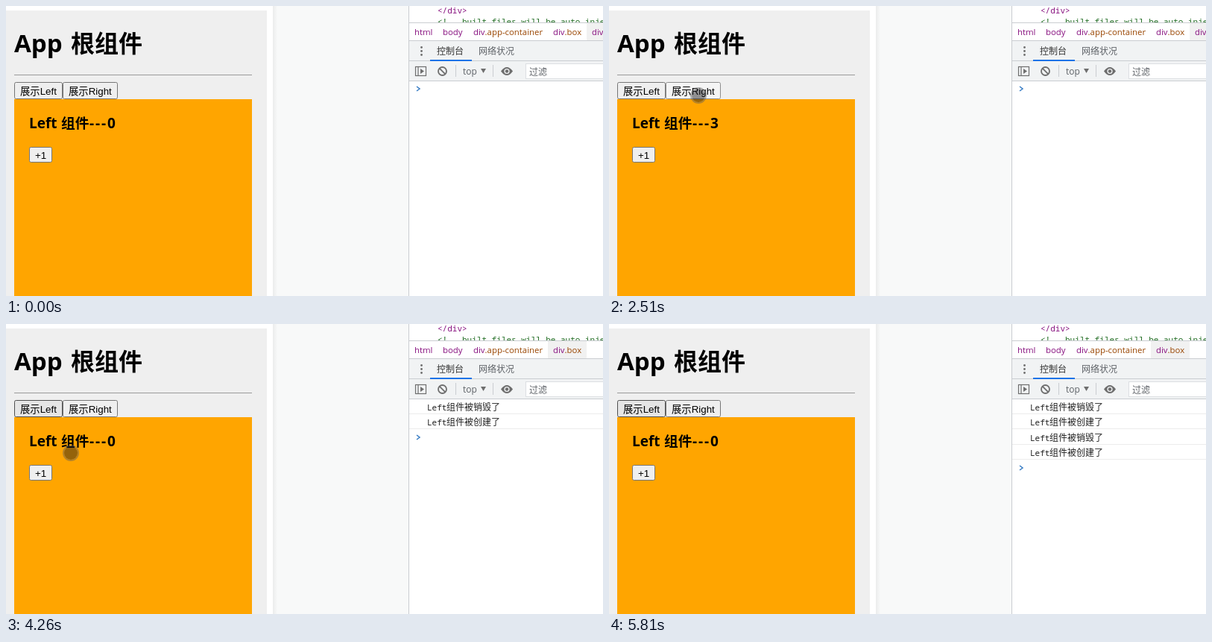
An HTML page with a canvas for the animation above (6340 ms loop, 801 by 389 pixels).

```html
<!DOCTYPE html>
<html lang="zh-CN">
<head>
<meta charset="utf-8">
<title>组件生命周期</title>
<style>
html, body { margin: 0; width: 100%; height: 100%; overflow: hidden; background: #fff; }
canvas { display: block; }
</style>
</head>
<body>
<canvas id="stage" width="801" height="389"></canvas>
<script>
const ctx = document.getElementById('stage').getContext('2d');
const LOOP = 6340;
const CJK = '"Noto Sans CJK SC", "Noto Sans CJK", sans-serif';
const HEAD = `"Noto Sans", ${CJK}`;
const BUTTON = `"Liberation Sans", ${CJK}`;
const MONO = '"Noto Sans Mono", monospace';
const CRUMB = '"Open Sans", sans-serif';
const PURPLE = '#881280', BROWN = '#994500', LINE = '#cacdd1', ICON = '#6e6e6e';

// Pointer moves: start, end, number of steps, evenly timed points
const moves = [
  [130, 740, 9, [[567, 358], [430, 280], [290, 203], [222, 180], [134, 133]]],
  [810, 1430, 10, [[135, 132], [120, 126], [78, 160], [38, 195]]],
  [1490, 1690, 4, [[38, 195], [40, 195]]],
  [1830, 2380, 9, [[50, 190], [76, 180], [97, 158], [113, 135], [120, 120]]],
  [2720, 3130, 7, [[120, 122], [105, 132], [82, 130], [64, 124]]],
  [3270, 3340, 2, [[62, 123], [61, 122]]],
  [4000, 4600, 10, [[61, 122], [66, 140], [75, 160], [93, 179.5], [130, 180], [146, 150], [122, 118]]],
  [4730, 5340, 10, [[122, 118], [122, 118], [90, 112], [61, 114]]],
];
const POINTER_HIDES = 5810;

// Values that hold from a given time on
const counts = [[0, 0], [1560, 1], [1690, 2], [1830, 3], [3610, 0]];
const views = [[0, 'Left'], [2580, 'Right'], [3610, 'Left'], [4800, 'Right'], [5540, 'Left']];
const plusStates = [[0, ''], [1360, 'hover'], [1490, 'active'], [1960, '']];
const leftStates = [[0, ''], [3270, 'hover'], [3540, 'active'], [3610, 'hover'], [4530, ''],
  [5270, 'hover'], [5470, 'active'], [5540, 'hover']];
const rightStates = [[0, ''], [2310, 'hover'], [2510, 'active'], [2580, 'hover'], [3270, ''],
  [4530, 'hover'], [4730, 'active'], [4930, 'hover'], [5270, '']];
const logs = views.slice(1).map(([time, view]) =>
  [time, view === 'Right' ? '组件被销毁了' : '组件被创建了']);

const at = (track, t) => track.filter(([time]) => time <= t).pop()[1];

function rect(x, y, w, h, color) {
  ctx.fillStyle = color;
  ctx.fillRect(x, y, w, h);
}

function text(str, x, y, font, color) {
  ctx.font = font;
  ctx.fillStyle = color;
  ctx.fillText(str, x, y);
}

function disc(x, y, r, color) {
  ctx.fillStyle = color;
  ctx.beginPath();
  ctx.arc(x, y, r, 0, Math.PI * 2);
  ctx.fill();
}

function polyline(points, color, width) {
  ctx.strokeStyle = color;
  ctx.lineWidth = width;
  ctx.beginPath();
  points.forEach(([x, y]) => ctx.lineTo(x, y));
  ctx.stroke();
}

function polygon(points, color) {
  ctx.fillStyle = color;
  ctx.beginPath();
  points.forEach(([x, y]) => ctx.lineTo(x, y));
  ctx.fill();
}

function button(label, x, y, w, h, state) {
  const [fill, border] = {
    '': ['#efefef', '#767676'],
    hover: ['#e5e5e5', '#4f4f4f'],
    active: ['#f5f5f5', '#8d8d8d'],
  }[state];
  ctx.beginPath();
  ctx.roundRect(x + .5, y + .5, w - 1, h - 1, 2);
  ctx.fillStyle = fill;
  ctx.fill();
  ctx.strokeStyle = border;
  ctx.lineWidth = 1;
  ctx.stroke();
  text(label, x + 8, y + h / 2 + 5, `13.333px ${BUTTON}`, '#000');
}

function drawPage(t) {
  rect(0, 0, 358, 389, '#fff');
  rect(0, 6, 350, 383, '#efefef');
  rect(358, 0, 183, 389, '#f8f9f9');
  const shade = ctx.createLinearGradient(358, 0, 364, 0);
  shade.addColorStop(0, '#ebecec');
  shade.addColorStop(1, '#f8f9f9');
  rect(358, 0, 6, 389, shade);

  text('App', 11, 62, `bold 33px ${HEAD}`, '#000');
  text('根组件', 87, 62, `bold 32px ${CJK}`, '#000');
  rect(11, 92, 319, 1, '#9a9a9a');
  button('展示Left', 11, 102, 65, 23, at(leftStates, t));
  button('展示Right', 76, 102, 74, 23, at(rightStates, t));

  const view = at(views, t), isLeft = view === 'Left';
  const bold = `bold 19px ${HEAD}`;
  rect(11, 125, 319, 264, isLeft ? '#ffa500' : '#87cefa');
  text(view, 31, 164, bold, '#000');
  text('组件', isLeft ? 74 : 87.5, 164, `bold 18.72px ${CJK}`, '#000');
  if (isLeft) {
    for (let i = 0; i < 3; i++) text('-', 112 + i * 8, 164, bold, '#000');
    text(at(counts, t), 136, 164, bold, '#000');
    button('+1', 31, 189, 31, 21, at(plusStates, t));
  }
}

function drawCrumbs(replaced) {
  const font = `11.4px ${CRUMB}`;
  rect(541, 22, 260, 1, LINE);
  rect(541, 23, 260, 23, '#fff');
  if (replaced) rect(727, 23, 52, 23, '#f1f1f1');
  else rect(779, 23, 22, 23, '#f1f1f1');
  text('html', 548, 39, font, PURPLE);
  text('body', 586, 39, font, PURPLE);
  for (const [x, name] of [[627, '.app-container'], [734, '.box']]) {
    text('div', x, 39, font, PURPLE);
    text(name, x + ctx.measureText('div').width, 39, font, BROWN);
  }
  if (!replaced) text('div', 786, 39, font, PURPLE);
}

function drawToolbar() {
  rect(541, 46, 260, 55, '#f1f3f4');
  for (const y of [46, 73, 100]) rect(541, y, 260, 1, LINE);
  for (const y of [55.5, 60.5, 65.5]) disc(557.5, y, 1.4, ICON);
  text('控制台', 578, 65, `12px ${CJK}`, '#333');
  text('网络状况', 634, 65, `12px ${CJK}`, '#5f6368');
  rect(569, 72, 56, 2, '#1a73e8');

  ctx.strokeStyle = ICON;
  ctx.lineWidth = 1.2;
  ctx.strokeRect(549.5, 81.5, 14, 12);
  polyline([[553, 81], [553, 94]], ICON, 1.2);
  polygon([[556, 84], [561, 87.5], [556, 91]], ICON);

  ctx.lineWidth = 1.8;
  ctx.beginPath();
  ctx.arc(585.5, 87.5, 5.5, 0, Math.PI * 2);
  ctx.stroke();
  polyline([[581.6, 83.6], [589.4, 91.4]], ICON, 1.8);

  rect(603, 79, 1, 16, LINE);
  rect(653, 79, 1, 16, LINE);
  text('top', 613, 92, `12px ${CRUMB}`, '#5f6368');
  polygon([[637, 84], [644, 84], [640.5, 90]], ICON);

  ctx.fillStyle = ICON;
  ctx.beginPath();
  ctx.moveTo(664, 87.5);
  ctx.quadraticCurveTo(672, 76.5, 680, 87.5);
  ctx.quadraticCurveTo(672, 98.5, 664, 87.5);
  ctx.fill();
  disc(672, 87.5, 3.6, '#f1f3f4');
  disc(672, 87.5, 2.2, ICON);

  rect(697, 77, 104, 21, '#dcdfe2');
  rect(698, 78, 103, 19, '#fff');
  text('过滤', 702, 93, `12px ${CJK}`, '#5f6368');
}

function drawConsole(t) {
  const rowHeight = 20.4;
  const shown = logs.filter(([time]) => time <= t);
  shown.forEach(([, message], i) => {
    const y = Math.round(116 + i * rowHeight);
    text('Left', 565, y, `11px ${MONO}`, '#222');
    text(message, 591, y, `12px ${CJK}`, '#222');
    rect(541, y + 4, 260, 1, '#ececec');
  });
  const y = Math.round(111 + shown.length * rowHeight);
  polyline([[551, y - 3], [555, y], [551, y + 3]], '#367cc4', 1.5);
}

function drawDevtools(t) {
  rect(541, 0, 260, 389, '#fff');
  text('</div>', 579, 10, `11px ${MONO}`, PURPLE);
  text('<!-- built files will be auto injected -->', 579, 25, `11px ${MONO}`, '#236e25');
  drawCrumbs(t >= views[1][0]);
  drawToolbar();
  drawConsole(t);
  rect(540, 0, 1, 389, LINE);
}

function pointerAt(t) {
  const [start, end, steps, points] = moves.filter(move => move[0] <= t).pop();
  // A small allowance keeps steps on the 10 ms time grid
  const step = Math.floor((t - start) / (end - start) * (steps - 1) + .15);
  const place = Math.min(1, step / (steps - 1)) * (points.length - 1);
  const i = Math.min(Math.floor(place), points.length - 2);
  return points[i].map((v, axis) => v + (points[i + 1][axis] - v) * (place - i));
}

function drawPointer(t) {
  if (t < moves[0][0] || t >= POINTER_HIDES) return;
  const [x, y] = pointerAt(t);
  disc(x, y, 9, 'rgba(20,20,25,.45)');
  ctx.strokeStyle = 'rgba(90,90,90,.45)';
  ctx.lineWidth = 2;
  ctx.beginPath();
  ctx.arc(x, y, 10, 0, Math.PI * 2);
  ctx.stroke();
}

function frame() {
  const t = performance.now() % LOOP;
  drawPage(t);
  drawDevtools(t);
  drawPointer(t);
  requestAnimationFrame(frame);
}
frame();
</script>
</body>
</html>
```
